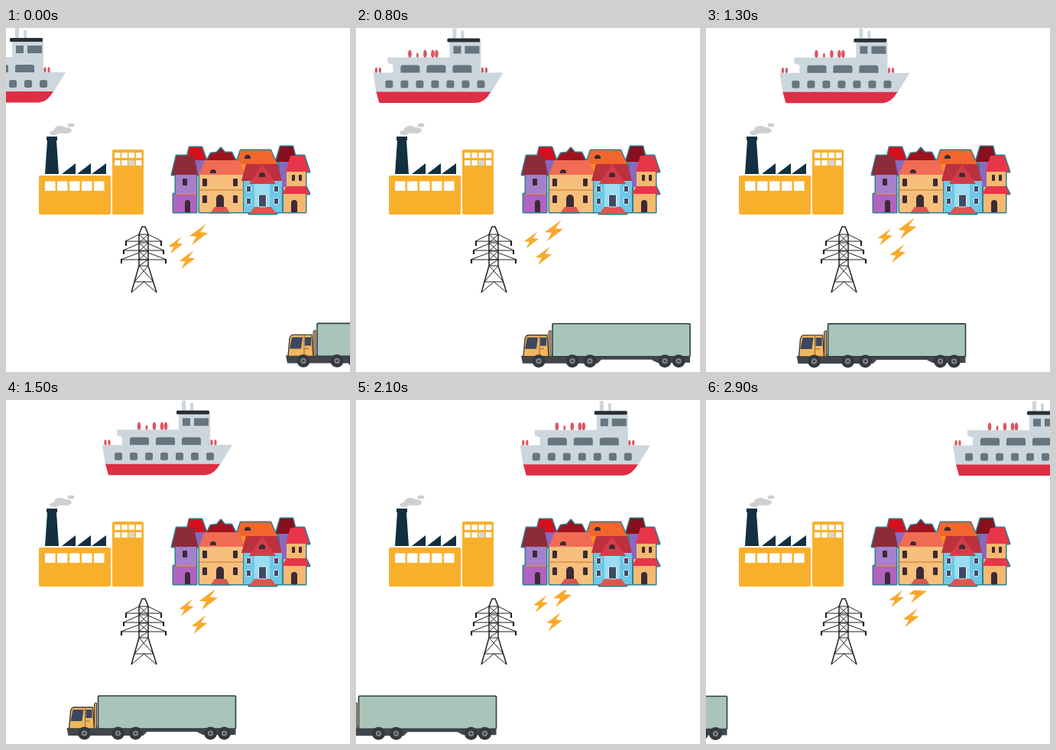
Recreate the animation shown at these times as an HTML page. Size 450 by 450 pixels, loop 3 s.

```html
<!DOCTYPE html>
<html lang="en">
<head>
<meta charset="utf-8">
<title>Transport and energy</title>
<style>
  html, body { margin: 0; width: 100%; height: 100%; overflow: hidden; background: #fff; }
  svg { display: block; width: 100vw; height: 100vh; }
</style>
</head>
<body>
<svg viewBox="0 0 450 450">
  <defs>
    <path id="bolt" d="M10-14L-12 2L-3 3L-9 14L12-2L2-3Z" fill="#f9a92b"/>
    <clipPath id="below"><path d="M0 249H450V450H0Z"/></clipPath>
    <g id="wheel">
      <circle r="8.5" fill="#35383c"/><circle r="3.6" fill="#85888b"/><circle r="1.8" fill="#44474b"/>
    </g>
    <ellipse id="person" cy="-4.5" rx="2.3" ry="5.5" fill="#de5560"/>
    <path id="deckWindow" d="M0 58V51q0-3 3-3h19q3 0 3 3v7z"/>
  </defs>

  <g id="ship">
    <path d="M104 0h5v13h-5zM115 3h4v10h-4z" fill="#ccd6dd"/>
    <use href="#person" x="48" y="38"/><use href="#person" transform="translate(58 38) scale(.6)"/>
    <use href="#person" x="68" y="38"/><use href="#person" x="78" y="38"/><use href="#person" x="83" y="38"/>
    <g id="sideCrew"></g>
    <path d="M0 58H26V48L19 45V38H100V18H141V58H170L154 84H4Z" fill="#ccd6dd"/>
    <path d="M4 83H154Q146 97 135 97.500H8Z" fill="#dd2e44"/>
    <rect x="97" y="13" width="43" height="5" rx="1.500" fill="#292f33"/>
    <g fill="#66757f">
      <use href="#deckWindow" x="36"/><use href="#deckWindow" x="70"/><use href="#deckWindow" x="104"/>
      <path d="M105 23h10v10h-10zM120 23h19v10h-19z"/>
      <g id="ports"></g>
    </g>
  </g>

  <g id="factory">
    <g fill="#cfcfd1">
      <ellipse cx="63" cy="137" rx="6" ry="3"/><ellipse cx="71" cy="133" rx="8" ry="5"/>
      <ellipse cx="78" cy="134" rx="8" ry="4"/><ellipse cx="85" cy="127" rx="4.500" ry="2.600"/>
    </g>
    <path d="M53 142H67V147H66L69 191H51L54 147H53ZM73 191L91 177V191ZM93 191L111 177V191ZM112 191L131 177V191Z" fill="#12303f"/>
    <g fill="#f8b02c">
      <rect x="43" y="193" width="94" height="51" rx="2"/><rect x="139" y="159" width="41" height="85" rx="2"/>
    </g>
    <g id="panes" fill="#fff"></g>
    <rect x="160.600" y="173" width="7.500" height="7" fill="#d9d5cb"/>
  </g>

  <g id="pylon" fill="none" stroke="#202020">
    <path d="M164 346L174 311V270L178 260H182L186 270V311L197 346" stroke-width="1.500"/>
    <path d="M174 270H186L174 281H186L174 292H186L174 303H186L174 311H186M186 281L174 270M186 292L174 281M186 303L174 292M174 311L193 332H168L186 311M164 346L180.500 332L197 346"/>
    <g id="arms"></g>
  </g>

  <g clip-path="url(#below)">
    <g id="bigBolt"><use href="#bolt"/></g>
    <g id="smallBolt"><use href="#bolt" transform="scale(.8)"/></g>
    <g id="lowBolt"><use href="#bolt" transform="scale(.87)"/></g>
  </g>

  <use href="#houses" stroke="#2d7f93" stroke-width="3" stroke-linejoin="round"/>
  <g id="houses">
    <path d="M240 172H260V192H240ZM358 175H374V208H358Z" fill="#8a68bd"/>
    <path d="M240 156H256L262 173H236Z" fill="#d50f1d"/>
    <path d="M262 175L268 164L276 163L281 157L286 163L295 163L301 175Z" fill="#a0121e"/>
    <path d="M302 174H354V188H302Z" fill="#f6921f"/>
    <path d="M307 160H346L354 178H301Z" fill="#f2662d"/>
    <path d="M359 155H375L380 175H353Z" fill="#86101c"/>

    <path d="M222 190H249V218H222Z" fill="#a580cb"/>
    <path d="M219 217H249V241H219Z" fill="#b063c1"/>
    <path d="M223 167H246L251 192H217Z" fill="#8e2b38"/>

    <path d="M253 191H310V241H253Z" fill="#f6c07c"/>
    <path d="M260 173H305L312 192H252Z" fill="#f06c54"/>

    <path d="M367 187H392V241H363V208H367Z" fill="#f5b870"/>
    <path d="M372 167H390L397 188H366ZM367 207H392L397 217H361Z" fill="#e8354a"/>

    <path d="M311 198H361V241H311Z" fill="#6dc8e7"/>
    <path d="M314 178H355L361 200H308Z" fill="#bd303d"/>
    <path d="M335 178L353 204H318Z" fill="#d43d48"/>
    <path d="M273 234H288L292 241H268ZM325 234H347L354 243H318Z" fill="#d8574f"/>
  </g>
  <path d="M325 204H345V234H325Z" fill="#9adcf0"/>
  <path d="M222 217h27M253 212h57" stroke="#d98d4a" stroke-width="1.500"/>
  <g id="openings" fill="#3c2a35"></g>
  <g id="framed" fill="#3f4a66" stroke="#e4f3f8"></g>

  <g id="truck">
    <path d="M0 429H40V426H221V438H178L170 434H105L100 439H2Z" fill="#41464b"/>
    <rect x="41" y="387" width="180" height="43" rx="1" fill="#a9c4b9" stroke="#2e3f49" stroke-width="1.600"/>
    <path d="M36 430V398q0-2 3-2V430Z" fill="#cf9a55" stroke="#3b3b40"/>
    <path d="M3 430L5 407Q6 402 10 402H34L36 430Z" fill="#f1b75f" stroke="#463d38" stroke-width="1.400"/>
    <path d="M8 405H22L20 420H5ZM25 405H33V416H25Z" fill="#3b4662"/>
    <path d="M24 403V429M25 420h5" stroke="#8a6535"/>
    <use href="#wheel" x="23" y="436"/><use href="#wheel" x="67" y="436"/><use href="#wheel" x="90" y="436"/>
    <use href="#wheel" x="188" y="436"/><use href="#wheel" x="206" y="436"/>
  </g>
</svg>

<script>
const el = id => document.getElementById(id);
const fill = (id, ...parts) => el(id).innerHTML = parts.join("");

// A grid of equal windows, (dx, dy) apart
function grid(x, y, w, h, columns, rows = 1, dx = 0, dy = 0, radius = 1) {
  let out = "";
  for (let r = 0; r < rows; r++)
    for (let c = 0; c < columns; c++)
      out += `<rect x="${x + c * dx}" y="${y + r * dy}" width="${w}" height="${h}" rx="${radius}"/>`;
  return out;
}

const arch = (x, y, w, h) => `<path d="M${x} ${y + h}v${w / 2 - h}a${w / 2} ${w / 2} 0 0 1 ${w} 0V${y + h}z"/>`;

// A pair of pylon arms with a hanging insulator at each end
function arms(y, reach, insulator) {
  const side = s => `<path d="M${180 + s * 6} ${y - 9}L${180 + s * reach} ${y}H180"/>
    <path d="M${180 + s * (reach - 1)} ${y}v${insulator}" stroke-width="2.2"/>`;
  return side(-1) + side(1);
}

const people = x => `<use href="#person" transform="translate(${x} 58) scale(.7)"/>`;

fill("sideCrew", people(4), people(9), people(143), people(148));
fill("ports", grid(16, 68, 10, 10, 7, 1, 20, 0, 2.5));
fill("panes", grid(51, 200.5, 13.5, 12.5, 5, 1, 16), grid(142, 163, 7.5, 7, 4, 2, 9.3, 10, 0.5));
fill("arms", arms(279, 24, 6), arms(291, 27, 5), arms(303, 30, 5));
fill("openings",
  grid(231, 197, 6, 9, 1), grid(257, 197, 6, 10, 2, 2, 40, 22), grid(374, 192, 4, 8, 2, 1, 9),
  arch(234, 225, 7, 16), arch(275, 218, 10, 16), arch(373, 225, 8, 16),
  arch(267, 185, 8, 5), arch(312, 166, 8, 5), arch(331, 189, 8, 6));
fill("framed", grid(314.5, 206.5, 6, 8, 2, 2, 36, 16), grid(330.5, 218, 10, 16, 1));

const clamp = (v, low, high) => Math.min(high, Math.max(low, v));
const move = (id, x, y) => el(id).setAttribute("transform", `translate(${x} ${y})`);

function draw(now) {
  const step = Math.floor(now % 3000 / 100);
  move("ship", clamp(14.8 * step - 96, -92, 323), 0.055 * step);
  move("truck", Math.min(366, 372 - 19.5 * step), 0.04 * step - 0.6);
  move("bigBolt", 252 + 0.86 * step, 270 - 0.62 * step);
  move("smallBolt", 222 + 0.94 * step, 284 - 0.83 * step);
  move("lowBolt", 237 + 1.07 * step, 303 - 0.62 * step);
  requestAnimationFrame(draw);
}
draw(performance.now());
</script>
</body>
</html>
```
